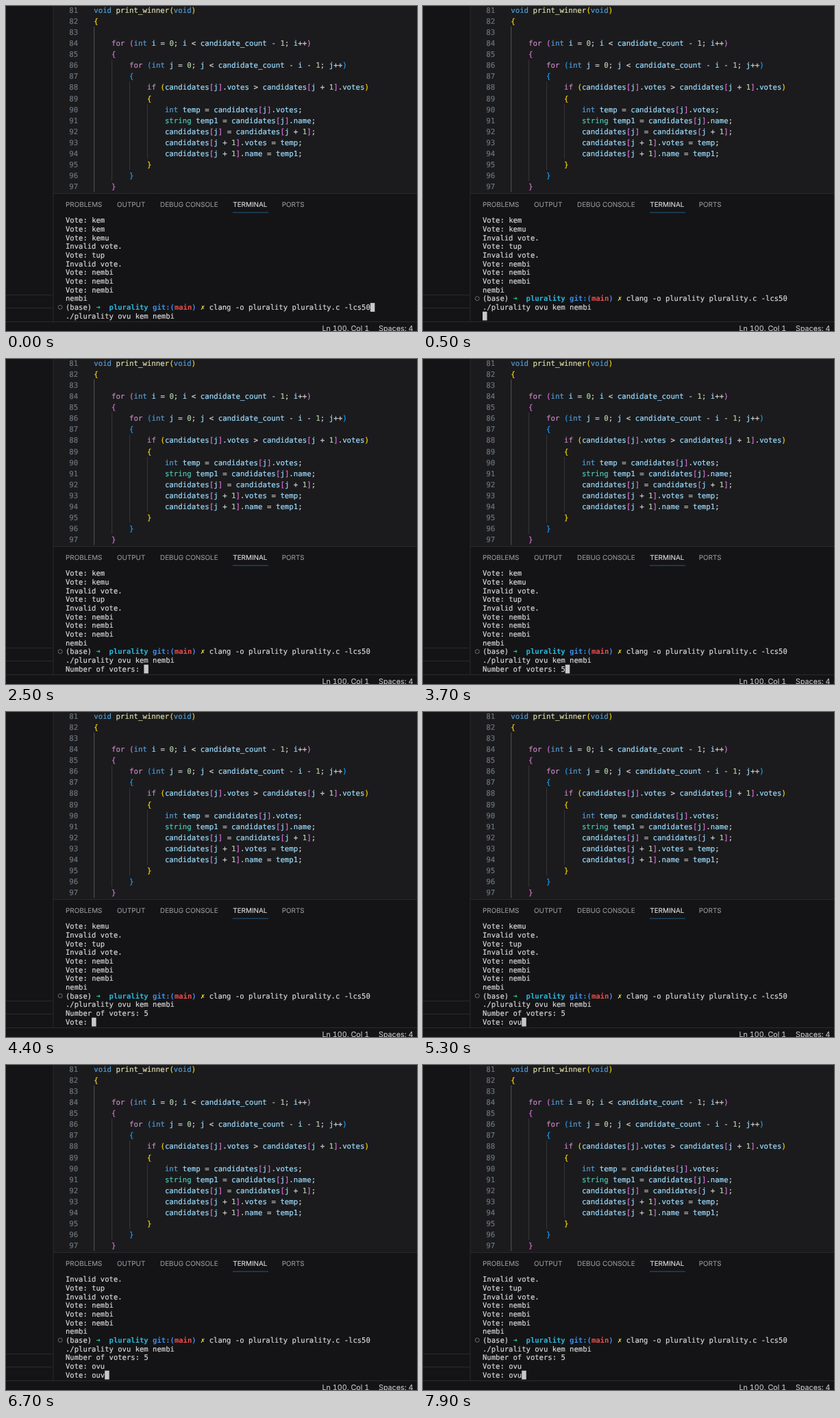
Animation of 600x474 px, one loop 8 s. Source, as an HTML page:

```html
<!DOCTYPE html>
<html lang="en">
<head>
<meta charset="utf-8">
<title>Editor and terminal</title>
<style>
  html, body { margin: 0; width: 100%; height: 100%; overflow: hidden; background: #141416; }
  svg { display: block; width: 600px; height: 474px; }
  text { text-rendering: geometricPrecision; fill: currentColor; stroke: currentColor; stroke-width: 0.2px; }
  .code { font: 10.765px "DejaVu Sans Mono", monospace; }
  .term { font: 10.555px "DejaVu Sans Mono", monospace; color: #d6d6d6; }
  .bold { font-weight: bold; stroke-width: 0; }
  .tabs { font: 9.9px Inter, sans-serif; color: #98989a; }
  .status { font: 10.75px Inter, sans-serif; font-variant-numeric: tabular-nums; color: #c6c6c8; }
  .tabs text, .status text { stroke-width: 0.1px; }
</style>
</head>
<body>
<svg id="stage" viewBox="0 0 600 474" xmlns="http://www.w3.org/2000/svg"></svg>
<script>
const LOOP = 8000;
const stage = document.getElementById('stage');

function add(parent, tag, attrs, text) {
  const node = document.createElementNS('http://www.w3.org/2000/svg', tag);
  for (const key in attrs) node.setAttribute(key, attrs[key]);
  if (text !== undefined) node.textContent = text;
  parent.appendChild(node);
  return node;
}
const rect = (x, y, width, height, fill, parent = stage) =>
  add(parent, 'rect', { x, y, width, height, fill });

// Window areas
const LINE = '#2a2a2c';
rect(0, 0, 600, 474, '#141416');
rect(69, 0, 531, 273, '#1b1b1d');
rect(68.5, 0, 1, 460, LINE);
rect(69, 273, 531, 1, LINE);
rect(0, 421, 68, 1, LINE);
rect(0, 440, 68, 1, LINE);
rect(0, 460, 600, 1, LINE);

// Editor
const CODE = { x: 128.2, y: 9.7, step: 16.1, adv: 6.481 };
const source = `void print_winner(void)
{

    for (int i = 0; i < candidate_count - 1; i++)
    {
        for (int j = 0; j < candidate_count - i - 1; j++)
        {
            if (candidates[j].votes > candidates[j + 1].votes)
            {
                int temp = candidates[j].votes;
                string temp1 = candidates[j].name;
                candidates[j] = candidates[j + 1];
                candidates[j + 1].votes = temp;
                candidates[j + 1].name = temp1;
            }
        }
    }`.split('\n');
const pairs = ['#ffd700', '#da70d6', '#179fff'];
let depth = 0;

function colorOf(token) {
  if (/^[([{]/.test(token)) return pairs[depth++ % 3];
  if (/^[)\]}]/.test(token)) return pairs[--depth % 3];
  if (/^(for|if)$/.test(token)) return '#c586c0';
  if (/^(void|int)$/.test(token)) return '#569cd6';
  if (token === 'string') return '#4ec9b0';
  if (token === 'print_winner') return '#dcdcaa';
  if (/^\d/.test(token)) return '#b5cea8';
  return /^\w/.test(token) ? '#9cdcfe' : '#d4d4d4';
}

// column, first row, end row, colour
[[0, 2, 17, '#58585a'], [4, 5, 16, '#38383a'], [8, 7, 15, '#38383a'], [12, 9, 14, '#38383a']]
  .forEach(([col, from, to, fill]) => {
    const top = from * CODE.step - 2.4;
    const end = Math.min(273, to * CODE.step - 2.4);
    rect(CODE.x + col * CODE.adv, top, 1, end - top, fill);
  });

const code = add(stage, 'g', { class: 'code' });
source.forEach((line, row) => {
  const y = CODE.y + row * CODE.step;
  add(code, 'text', { x: 92.2, y, color: '#6c737c' }, 81 + row);
  for (const m of line.matchAll(/\w+|[^\s\w]/g)) {
    add(code, 'text', { x: CODE.x + m.index * CODE.adv, y, color: colorOf(m[0]) }, m[0]);
  }
});

// Panel tabs
const tabs = add(stage, 'g', { class: 'tabs' });
[[87, 'PROBLEMS'], [162, 'OUTPUT'], [225, 'DEBUG CONSOLE'], [331.3, 'TERMINAL'], [402.7, 'PORTS']]
  .forEach(([x, name]) => {
    const tab = add(tabs, 'text', { x, y: 293 }, name);
    if (name === 'TERMINAL') tab.setAttribute('color', '#e2e2e2');
  });
rect(331, 300.7, 52, 1, '#235a80');

// Terminal
const TERM = { x: 87, y: 316.2, step: 12.67, adv: 6.355 };
const term = add(stage, 'g', { class: 'term' });
const history = ['Vote: kem', 'Vote: kem', 'Vote: kemu', 'Invalid vote.', 'Vote: tup', 'Invalid vote.',
  'Vote: nembi', 'Vote: nembi', 'Vote: nembi', 'nembi', '', './plurality ovu kem nembi'];
const PROMPT = 10;
const COMMAND_END = 70;

function write(parent, text, y, col = 0, attrs = {}) {
  for (const m of text.matchAll(/\S+/g)) {
    add(parent, 'text', { x: TERM.x + (col + m.index) * TERM.adv, y, ...attrs }, m[0]);
  }
}

const rows = [];
for (let i = 0; i < history.length + 3; i++) {
  const row = add(term, 'g', {});
  write(row, history[i] || '', TERM.y + i * TERM.step);
  rows.push(row);
}
const promptY = TERM.y + PROMPT * TERM.step;
[[0, '(base)'], [7, '➜', '#23d18b'], [10, 'plurality', '#29b8db'], [20, 'git:(', '#3b8eea'],
 [25, 'main', '#f14c4c'], [29, ')', '#3b8eea'], [31, '✗', '#f5f543'],
 [33, 'clang -o plurality plurality.c -lcs50']]
  .forEach(([col, text, color]) =>
    write(rows[PROMPT], text, promptY, col, color ? { color, class: 'bold' } : {}));
add(rows[PROMPT], 'circle', { cx: 79.2, cy: promptY - 3.6, r: 3, fill: 'none', stroke: '#77777a', 'stroke-width': 0.9 });
const cursor = rect(0, 0, 6.5, 12.8, '#c8c8ca', term);

// Status bar
const status = add(stage, 'g', { class: 'status' });
[[461.5, 'Ln 100, Col 1'], [544, 'Spaces: 4'], [608.5, 'UTF-8']]
  .forEach(([x, text]) => add(status, 'text', { x, y: 473.9 }, text));

// Program output over time; null while the command waits
const ask = 'Number of voters: ';
const first = ask + '5\nVote: ';
const second = first + 'ovu\nVote: ';
const steps = [
  [0, null], [300, ''], [900, ask], [3300, ask + '5'], [3900, first],
  [5100, first + 'o'], [5200, first + 'ov'], [5300, first + 'ovu'], [5500, second],
  [6400, second + 'o'], [6500, second + 'ou'], [6700, second + 'ouv'],
  [6900, second + 'ou'], [7100, second + 'o'], [7200, second + 'ov'], [7300, second + 'ovu']
];
let shown;

function showOutput(output) {
  if (output === shown) return;
  shown = output;
  const lines = output === null ? [] : output.split('\n');
  const scroll = lines.length;
  rows.forEach((row, i) => {
    row.style.display = i < scroll ? 'none' : '';
    if (i < history.length) return;
    row.textContent = '';
    write(row, lines[i - history.length] || '', TERM.y + i * TERM.step);
  });
  const curRow = scroll ? history.length + scroll - 1 : PROMPT;
  const curCol = scroll ? lines[scroll - 1].length : COMMAND_END;
  cursor.setAttribute('x', TERM.x + curCol * TERM.adv);
  cursor.setAttribute('y', TERM.y + curRow * TERM.step - 9.8);
  term.setAttribute('transform', `translate(0 ${-scroll * TERM.step})`);
}

function draw(now) {
  const t = now % LOOP;
  showOutput(steps.filter(([at]) => at <= t).pop()[1]);
  const shift = t >= 1000 && t < 1300 ? -18.5 : 0;
  status.setAttribute('transform', `translate(${shift} 0)`);
}

const start = performance.now();
function tick() {
  draw(performance.now() - start);
  requestAnimationFrame(tick);
}
tick();
</script>
</body>
</html>
```
